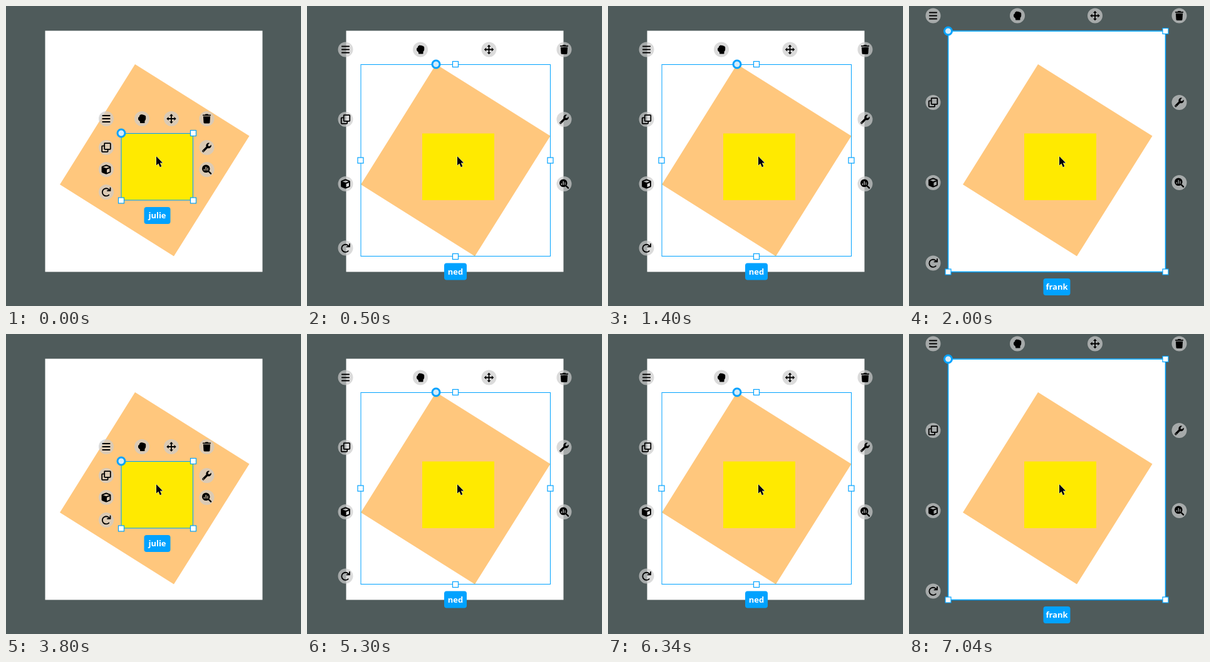
Write an HTML page that moves like this. It is 471 px wide and 479 px high and loops after 8000 ms.

```html
<!DOCTYPE html>
<html lang="en">
<head>
<meta charset="utf-8">
<title>Nested selection</title>
<style>
html, body { margin: 0; width: 100%; height: 100%; overflow: hidden; background: #4f5b5b; }
svg { display: block; width: 471px; height: 479px; }
.disc { fill: #ccc; fill-opacity: .7; }
.frame { fill: none; stroke: #00a2ff; }
.handle { fill: #fff; stroke: #00a2ff; stroke-width: 1.2; }
.pivot { fill: #d3ebfa; stroke: #00a2ff; stroke-width: 3; }
.tag { fill: #00a2ff; }
.name { font: 700 13px "Open Sans", "Noto Sans", sans-serif; fill: #fff; text-anchor: middle; }
.line { fill: none; stroke: #000; stroke-width: 1.8; stroke-linecap: round; stroke-linejoin: round; }
.solid { fill-rule: evenodd; }
</style>
</head>
<body>
<svg id="stage" viewBox="0 0 471 479">
  <defs>
    <g id="menu"><path class="line" d="M-5.7-5H5.7M-5.7 0H5.7M-5.7 5H5.7"/></g>
    <g id="fist"><path d="M-2.5-6Q-1.5-7.5 0-6.6Q1.5-7.3 2.6-6Q4-6.5 5-5Q6.3-5 6.2-3V0Q6 2 4.5 3.5V6.2Q4.5 7 3.7 7H-2.2Q-3 7-3 6.2V4.5L-5.5 2Q-6.2 1-6-1Q-6-3-4-3.5V-4.5Q-4-6-2.5-6Z"/></g>
    <g id="move">
      <path class="line" d="M-5 0H5M0-5V5"/>
      <path d="M0-7.8L3-4.4H-3ZM0 7.8L3 4.4H-3ZM-7.8 0L-4.4-3V3ZM7.8 0L4.4-3V3Z"/>
    </g>
    <g id="trash"><path d="M-2-7.5H2L2.6-6.5H5.9Q6.5-6.5 6.5-5.6T5.9-4.7H-5.9Q-6.5-4.7-6.5-5.6T-5.9-6.5H-2.6ZM-5.6-3.7H5.6L5 6.1Q4.9 7.5 3.5 7.5H-3.5Q-4.9 7.5-5 6.1Z"/></g>
    <g id="clone"><path class="line" d="M-2.6-6.8H6Q6.8-6.8 6.8-6V2Q6.8 2.8 6 2.8H-2Q-2.8 2.8-2.8 2V-6Q-2.8-6.8-2-6.8M-4.2-2.7H-6Q-6.8-2.7-6.8-1.9V6Q-6.8 6.8-6 6.8H1.8Q2.6 6.8 2.6 6V4.2"/></g>
    <g id="cube"><path class="solid" d="M-.7-7.4Q0-7.7.7-7.4L6.3-5.3Q7.4-4.9 7.4-3.7V3.6Q7.4 4.8 6.3 5.3L.7 7.4Q0 7.7-.7 7.4L-6.3 5.3Q-7.4 4.8-7.4 3.6V-3.7Q-7.4-4.9-6.3-5.3ZM0-5.5L-5-3.7L0-1.9L5-3.7ZM1 5.2L5.5 3.5V-1.8L1-.1Z"/></g>
    <g id="redo"><path class="line" d="M4.3 4.6A6.1 6.1 0 1 1 4-4.2L5.8-2.5M6.5-6.6V-2.1H2"/></g>
    <g id="wrench"><path class="solid" d="M7.2-4.6L4.8-2.2H2.2V-4.8L4.6-7.2A4.5 4.5 0 0 0-1-1.4L-6.9 4.5A1.7 1.7 0 0 0-4.5 6.9L1.4 1A4.5 4.5 0 0 0 7.2-4.6ZM-5.9 5.4a.7.7 0 1 0 1.4 0a.7.7 0 1 0-1.4 0Z"/></g>
    <g id="chart">
      <path class="line" style="stroke-width:2.3" d="M3.5 3.5L6.6 6.6"/>
      <path class="solid" d="M-7.5-1.2a6.3 6.3 0 1 0 12.6 0a6.3 6.3 0 1 0-12.6 0ZM-4.7-.7h1.3V1.8h-1.3ZM-1.9-4.3h1.3V1.8h-1.3ZM.9-2.4h1.3V1.8H.9Z"/>
    </g>
  </defs>
  <rect width="471" height="479" fill="#4f5b5b"/>
  <rect x="62.5" y="39.5" width="347" height="385" fill="#fff"/>
  <path d="M206 93L388.5 207.5L268 399.5L86 285Z" fill="#ffc77d"/>
  <rect x="184" y="203.5" width="115" height="106.5" fill="#ffea00"/>
  <g id="picks"></g>
  <path d="M240 240V254.4L243.3 251.4L245.9 257.2L248.4 256.1L245.9 250.4H250.2Z"
        stroke="#fff" stroke-width="1" stroke-linejoin="round" paint-order="stroke"/>
</svg>
<script>
const NS = "http://www.w3.org/2000/svg";
const LOOP = 8000;

// box: left, top, right, bottom; cols and rows: button centres; tag: x, y, width
const picks = [
  { name: "julie", box: [184, 203.5, 298.5, 310], weight: 1.1, pivot: [184, 203],
    handles: [[299, 203], [184, 310.5], [299, 310.5]],
    cols: [160, 217, 264, 320.5], rows: [180, 226, 261, 297], tag: [220.5, 321, 42] },
  { name: "ned", box: [86, 93.5, 388.5, 399.5], weight: 1, pivot: [206, 93],
    handles: [[237, 93], [85.5, 246.5], [388.5, 246.5], [237, 400]],
    cols: [61.5, 181, 290.5, 410.5], rows: [69.5, 181, 284, 386.5], tag: [219, 410.5, 36] },
  { name: "frank", box: [62.5, 40, 409.5, 424.5], weight: 1.6, pivot: [62.5, 40],
    handles: [[409.5, 40], [62.5, 424.5], [409.5, 424.5]],
    cols: [38.5, 173, 297, 431.5], rows: [15.5, 154, 282, 410.5], tag: [214.5, 435, 43] }
];

// icon, column, row
const buttons = [
  ["menu", 0, 0], ["fist", 1, 0], ["move", 2, 0], ["trash", 3, 0],
  ["clone", 0, 1], ["wrench", 3, 1], ["cube", 0, 2], ["chart", 3, 2], ["redo", 0, 3]
];

// start time, selected item
const steps = [[0, 0], [500, 1], [2000, 2], [3800, 0], [5300, 1], [7040, 2]];

function add(parent, tag, attrs) {
  const el = document.createElementNS(NS, tag);
  for (const key in attrs) el.setAttribute(key, attrs[key]);
  return parent.appendChild(el);
}

function build(pick) {
  const g = add(document.getElementById("picks"), "g", {});
  const [l, t, r, b] = pick.box;
  add(g, "rect", { class: "frame", x: l, y: t, width: r - l, height: b - t, "stroke-width": pick.weight });
  for (const [x, y] of pick.handles)
    add(g, "rect", { class: "handle", x: x - 4.5, y: y - 4.5, width: 9, height: 9 });
  add(g, "circle", { class: "pivot", cx: pick.pivot[0], cy: pick.pivot[1], r: 6 });
  for (const [icon, col, row] of buttons) {
    const x = pick.cols[col], y = pick.rows[row];
    add(g, "circle", { class: "disc", cx: x, cy: y, r: 12 });
    add(g, "use", { href: "#" + icon, x, y });
  }
  const [x, y, w] = pick.tag;
  add(g, "rect", { class: "tag", x, y, width: w, height: 27, rx: 4 });
  add(g, "text", { class: "name", x: x + w / 2, y: y + 18 }).textContent = pick.name;
  return g;
}

const groups = picks.map(build);
const start = performance.now();

function draw(now) {
  const time = Math.max(0, now - start) % LOOP;
  const active = steps.filter(s => s[0] <= time).pop()[1];
  groups.forEach((g, i) => g.setAttribute("display", i === active ? "inline" : "none"));
  requestAnimationFrame(draw);
}
draw(start);
</script>
</body>
</html>
```
